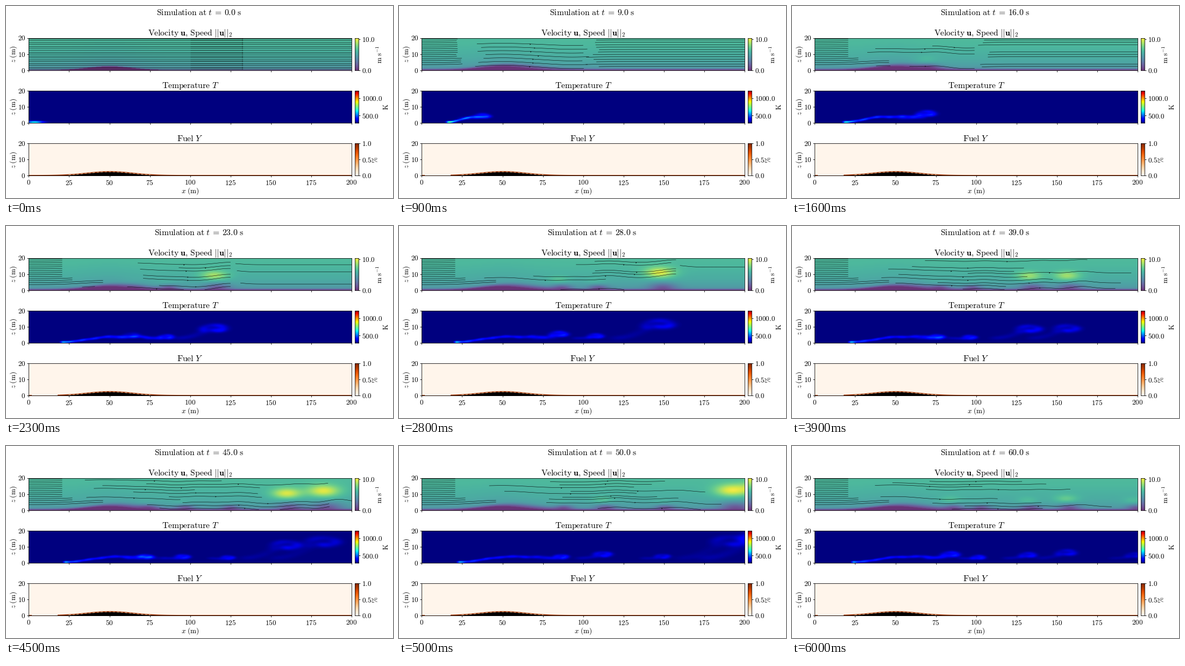
Recreate the animation shown at these times as a matplotlib script. Size 720 by 358 pixels, loop 6100 ms.

```python
import numpy as np
import matplotlib.pyplot as plt
from matplotlib.animation import FuncAnimation
from matplotlib.collections import LineCollection
from matplotlib.patches import Rectangle

plt.rcParams["mathtext.fontset"] = "cm"
plt.rcParams["axes.linewidth"] = 0.6

W, H, DPI = 720, 358, 100
FRAMES, INTERVAL = 61, 100
LABEL, TITLE = 9.5, 11.25
X = np.linspace(0, 200, 301)
Z = np.linspace(0, 20, 81)
EXTENT = (0, 200, 0, 20)

# Vortices shed from the plume: (time, x, z) waypoints
TRACKS = [
    [(3, 14, 1.5), (9, 38, 4), (16, 70, 5.5), (23, 116, 8.7), (33, 181, 13.5), (37, 212, 15)],
    [(15, 62, 3.5), (23, 86, 3.5), (33, 131, 4.5), (45, 184, 12.5), (50, 212, 15)],
    [(21, 56, 4), (33, 107, 6), (45, 161, 10.5), (50, 193, 13), (53, 212, 15)],
    [(31, 60, 3.5), (45, 124, 3), (50, 150, 3.7), (60, 199, 4.5)],
    [(34, 60, 3.5), (45, 96, 3.5), (50, 113, 5), (60, 157, 6)],
    [(41, 62, 3.5), (50, 87, 3.5), (60, 133, 4.6)],
    [(51, 66, 3.5), (60, 102, 3.2)],
    [(53, 66, 3.5), (60, 85, 5)],
]


def terrain(x):
    return 2.4 * np.exp(-(((x - 50) / 20) ** 2))


def bump(x, mid, width):
    return np.exp(-(((x - mid) / width) ** 2))


def splat(x, z, sx, sz, amp):
    """Sum of Gaussian spots on the grid."""
    x, z, sx, sz, amp = (
        a[:, None] for a in np.broadcast_arrays(*map(np.atleast_1d, (x, z, sx, sz, amp)))
    )
    gx = np.exp(-0.5 * ((X - x) / sx) ** 2)
    gz = np.exp(-0.5 * ((Z - z) / sz) ** 2)
    return (amp * gz).T @ gx


def vortices(t):
    """Active vortices as (x, z, strength)."""
    found = []
    for points in TRACKS:
        times, xs, zs = zip(*points)
        if times[0] < t <= times[-1]:
            grow = min((t - times[0]) / 4, 1)
            found.append((np.interp(t, times, xs), np.interp(t, times, zs), grow))
    return found


def speed_field(t):
    height = np.maximum(Z[:, None] - terrain(X), 0)
    speed = 6.4 * (height / 20) ** 0.14
    grown = min(t / 6, 1)
    depth = 0.8 + 1.2 * bump(X, 66, 20) * grown
    speed *= 1 - 0.75 * grown * np.exp(-((height / depth) ** 2))
    calm = np.zeros_like(speed)
    for x, z, s in vortices(t):
        gain = np.clip(0.5 * (z - 2.6), 0, 4) * s * np.clip((x - 55) / 30, 0, 1)
        speed += splat(x - 1, 0.75 * z + 2.5, 3.5 + 0.3 * z, 1 + 0.14 * z, gain)
        if x > 60:
            calm += splat(x + 1, 1.2, 3.5 + 0.25 * z, 1 + 0.12 * z, 0.7 * s)
    return speed * (1 - np.clip(calm, 0, 0.85))


def curl(x, z, s, t):
    """Hot gas rolled into a vortex with a trailing tail."""
    rx, rz = 2 + 0.75 * z, 0.6 + 0.26 * z
    phi = np.radians(np.linspace(215, -140, 22))
    r = np.linspace(1, 0.35, 22)
    ax, az = x + rx * r * np.cos(phi), z + rz * r * np.sin(phi)
    sx, sz = 1 + 0.15 * z, 0.45 + 0.05 * z
    field = splat(ax, az, sx, sz, 1 + 0.4 * np.sin(3 * phi + t))
    tail = np.linspace(0, 1, 12)
    tx = ax[0] - 2 * rx * (1 - tail)
    tz = 2.8 + (az[0] - 2.8) * tail**2
    field += splat(tx, tz, sx * 1.2, sz, 0.45)
    field += splat(x, z, 0.6 * rx, 0.6 * rz, 0.7)
    peak = 0.16 * s * np.exp(-max(x - 90, 0) / 150)
    return field * peak / field.max()


def heat_field(t):
    front = np.interp(t, [0, 9, 23, 60], [2, 15.5, 20, 23])
    end = np.interp(t, [0, 9, 15, 23], [3, 45, 68, 86])
    climb = np.interp(t, [0, 9, 23], [8, 18, 32])
    s = np.maximum(X - front, 0)
    u = np.clip(s / climb, 0, 1)
    mid = 0.4 + 3.3 * u * u * (3 - 2 * u) - 0.05 * np.maximum(X - 68, 0)
    mid += 0.2 * np.sin(0.35 * X - 1.5 * t) * np.clip(s / 40, 0, 1)
    amp = 0.22 * np.exp(-s / 90) + 0.2 * np.exp(-s / 5)
    amp *= np.interp(t, [9, 30], [1, 0.75]) * (1 + 0.15 * np.sin(0.8 * X - 3 * t))
    amp *= np.clip((end - X) / 16, 0, 1) * np.clip((X - front + 1) / 2, 0, 1)
    thick = 0.38 + 0.006 * s
    heat = amp * np.exp(-0.5 * ((Z[:, None] - mid) / thick) ** 2)
    heat += splat(
        front + 1.5, 0.4,
        np.interp(t, [0, 4], [3.6, 1.3]), 0.45,
        np.interp(t, [0, 9, 23, 60], [0.4, 0.2, 0.08, 0.03]),
    )
    for x, z, grow in vortices(t):
        heat += curl(x, z, grow, t)
    return heat


def flow_path(x0, x1, z0, t):
    x = np.linspace(x0, x1, int(x1 - x0) + 2)
    if t == 0:
        return np.column_stack([x, np.full_like(x, z0)])
    z = z0 + 1.8 * bump(x, 50, 22) * (1 - z0 / 30) - 0.5 * bump(x, 92, 14)
    for xv, zv, s in vortices(t):
        if xv > 60:
            lift = 0.16 * zv * s * (1 - z0 / 40)
            z += lift * (bump(x, xv + 8, 9) - 0.6 * bump(x, xv - 14, 12))
    inside = (z > terrain(x) + 0.3) & (z < 19.8)
    return np.column_stack([x, np.where(inside, z, np.nan)])


def streamlines(k, t):
    """Line paths and arrow places for one moment."""
    if k == 0:
        rows = 0.7 + 1.18 * np.arange(17)
        paths = [flow_path(0, 200, z, 0) for z in rows]
        paths += [flow_path(100, 132.5, z, 0) for z in rows]
        return paths, [(132.5, z) for z in rows]

    rng = np.random.default_rng(k)
    lanes, marked = [], []
    for i in range(14):
        stop = 20.7 if i < 10 else 27 if i < 12 else 46
        if t < 14:
            stop = 21.8 + rng.uniform(-0.5, 0.5) + (3 if i > 9 else 0)
        lanes.append((0, stop, 19.3 - 1.22 * i))

    head = vortices(t)[0][0] if 3 < t < 37 else 0
    start = max(102, head + 12)
    if t < 34 and start < 175:
        keep = np.clip(1 - (t - 12) / 14, 0.25, 1)
        for i in range(12):
            if rng.random() < keep:
                lanes.append((start + rng.uniform(-1, 8), 200, 18.8 - 1.5 * i))

    if t < 14:
        for z in np.arange(1.4, 18, 2.4):
            marked.append((36 + rng.uniform(-4, 4), 102 + rng.uniform(-3, 3), z))
    else:
        limit = start - 3 if t < 34 else 200
        for z in 1 + 1.9 * np.arange(10) + rng.uniform(-0.4, 0.4, 10):
            x0, length = rng.uniform(32, 110), rng.uniform(55, 115)
            x1 = min(x0 + length, limit)
            if rng.random() < 0.85 and x1 - x0 > 25:
                marked.append((x0, x1, z))

    paths = [flow_path(*lane, t) for lane in lanes]
    middle = [flow_path(*lane, t) for lane in marked]
    arrows = [p[len(p) // 2] for p in middle]
    return paths + middle, arrows


fig = plt.figure(figsize=(W / DPI, H / DPI), dpi=DPI)


def pixel_axes(x, y, w, h):
    return fig.add_axes([x / W, 1 - (y + h) / H, w / W, h / H])


def write(x, y, text, size, **kw):
    return fig.text(x / W, 1 - y / H, text, fontsize=size, ha="center", **kw)


def panel(row, title, cmap, low, high, ticks, unit, unit_x, unit_size, alpha=1):
    top, tall = 59.5 + 98.4 * row, 60.1
    ax = pixel_axes(42.4, top, 600.6, tall)
    ax.set_xlim(0, 200)
    ax.set_ylim(0, 20)
    ax.set_xticks(range(0, 201, 25))
    ax.set_yticks([0, 10, 20], ["$0$", "$10$", "$20$"])
    last = row == 2
    ax.set_xticklabels([f"${x}$" if last else "" for x in range(0, 201, 25)])
    ax.tick_params(length=2.3, width=0.6, pad=2.2, labelsize=LABEL)
    write(342.7, top - 4.4, title, TITLE, va="baseline")
    write(14, top + 30.5, r"$z\ \mathrm{(m)}$", LABEL, va="center", rotation=90)

    bar = pixel_axes(649.4, top, 6.6, tall)
    bar.imshow(np.linspace(0, 1, 256)[:, None], cmap=cmap, origin="lower",
               aspect="auto", extent=(0, 1, low, high), alpha=alpha)
    bar.set_xticks([])
    bar.yaxis.tick_right()
    bar.set_yticks(ticks, [f"${v:.1f}$" for v in ticks])
    bar.tick_params(length=2.3, width=0.6, pad=2.2, labelsize=LABEL)
    write(unit_x, top + 30.5, unit, unit_size, va="center", rotation=90)
    return ax


def field_image(ax, cmap, vmax, alpha=1):
    return ax.imshow(np.zeros((len(Z), len(X))), cmap=cmap, vmin=0, vmax=vmax,
                     origin="lower", extent=EXTENT, aspect="auto",
                     interpolation="bilinear", alpha=alpha)


wind = panel(0, r"$\mathrm{Velocity}\ \mathbf{u},\,\mathrm{Speed}\ ||\mathbf{u}||_2$",
             "viridis", 0, 10.5, [0, 10], r"$\mathrm{m}\ \mathrm{s}^{-1}$", 695, LABEL, 0.8)
hot = panel(1, r"$\mathrm{Temperature}\ T$", "jet", 290, 1220, [500, 1000],
            r"$\mathrm{K}$", 707.5, LABEL)
fuel = panel(2, r"$\mathrm{Fuel}\ Y$", "Oranges", 0, 1, [0, 0.5, 1], r"$\%$", 687, LABEL)

wind_img = field_image(wind, "viridis", 10.5, 0.8)
heat_img = field_image(hot, "jet", 1)
lines = wind.add_collection(LineCollection([], colors="black", linewidths=0.4))
arrows, = wind.plot([], [], ">", color="black", ms=1.5, mew=0)

oranges = plt.get_cmap("Oranges")
ground = terrain(X)
fuel.set_facecolor(oranges(0.0))
fuel.fill_between(X, ground - 0.1, ground + 0.6, color=oranges(0.92), lw=0, zorder=1)
burnt = fuel.add_patch(Rectangle((2, 0), 0, 1, color=oranges(0.0), lw=0, zorder=1.5))
fuel.fill_between(X, 0, ground, color="black", lw=0, zorder=2)
hill = (X > 24) & (X < 76)
fuel.plot(X[hill], ground[hill] + 0.02, color=oranges(0.25), lw=0.6,
          dashes=(5, 4), zorder=3)

write(342.7, 349, r"$x\ \mathrm{(m)}$", LABEL, va="baseline")
clock = write(359.5, 17, "", TITLE, va="baseline")


def update(k):
    t = float(k)
    clock.set_text(rf"$\mathrm{{Simulation\ at}}\ t\:=\:{t:.1f}\ \mathrm{{s}}$")
    wind_img.set_data(speed_field(t))
    heat_img.set_data(heat_field(t))
    paths, heads = streamlines(k, t)
    lines.set_segments(paths)
    arrows.set_data(*np.transpose(heads))
    burnt.set_width(15.7 * min(t / 9, 1))
    return wind_img, heat_img, lines, arrows, burnt, clock


anim = FuncAnimation(fig, update, frames=FRAMES, interval=INTERVAL, repeat=True,
                     repeat_delay=0)
plt.show()
```
